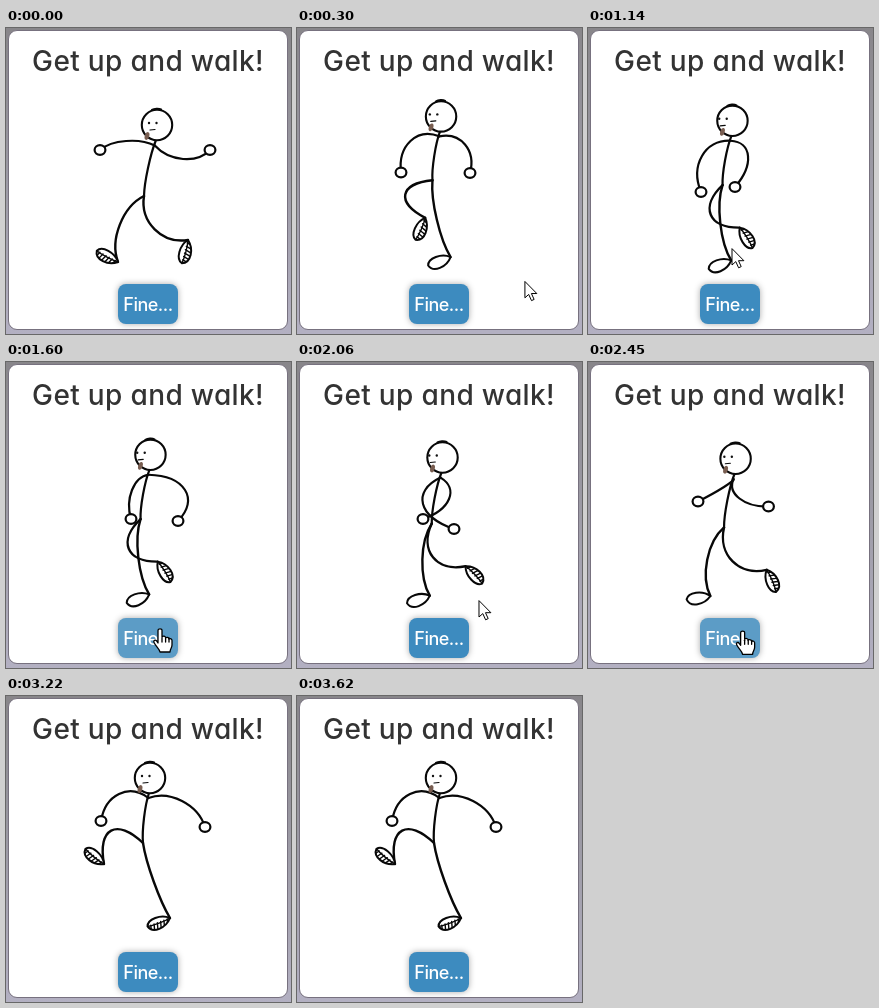
Animation, 285 px wide and 306 px high, one loop 3680 ms. Source, as an HTML page with a canvas:

```html
<!DOCTYPE html>
<html lang="en">
<head>
<meta charset="utf-8">
<title>Get up and walk!</title>
<style>
  html, body { margin: 0; width: 100%; height: 100%; overflow: hidden; }
  body {
    position: relative;
    background: linear-gradient(#88868a, #9d9ba6 50%, #b3b0c2);
    font-family: Inter, "Open Sans", sans-serif;
    font-feature-settings: "cv11";
    font-weight: 500;
    white-space: nowrap;
    text-align: center;
  }
  .card {
    position: absolute; left: 2px; top: 2px; width: 278px; height: 298px;
    background: #fff; border: 1px solid #77717f; border-radius: 9px;
  }
  h1 {
    position: absolute; left: 0; top: 16px; width: 284px; margin: 0;
    font-size: 28px; line-height: 34px; font-weight: 500; letter-spacing: .35px;
    color: #333;
  }
  .btn {
    position: absolute; left: 112px; top: 256px; width: 60px; height: 40px;
    border-radius: 8px; background: #3d8bbf; box-shadow: 0 0 6px #aaa;
    color: #fff; font-size: 18px; line-height: 41px; letter-spacing: -.5px;
  }
  .btn.hover { background: #5c9cc6; }
  canvas { position: absolute; left: 0; top: 0; }
</style>
</head>
<body>
<div class="card"></div>
<h1>Get up and walk!</h1>
<div class="btn">Fine...</div>
<canvas width="285" height="306"></canvas>
<script>
const LOOP = 3680, STEP = LOOP / 48, STRIDE = 6;
const ctx = document.querySelector('canvas').getContext('2d');
const btn = document.querySelector('.btn');

const lerp = (a, b, k) => a + (b - a) * k;
const mix = (a, b, k) => a.map((v, i) => lerp(v, b[i], k));
const smooth = k => k * k * (3 - 2 * k);

// Value of a keyed track [time, ...values] at time t
function along(track, t, ease = k => k) {
  const i = track.findIndex(key => key[0] > t);
  if (i === 0) return null;
  if (i < 0) return track.at(-1).slice(1);
  const [a, b] = [track[i - 1], track[i]];
  return mix(a.slice(1), b.slice(1), ease((t - a[0]) / (b[0] - a[0])));
}

// Arms through two strides: drawing, elbow x,y, hand x,y
const reach = [120, 113, 94, 122], reachBack = [177, 131, 204, 122];
const kick = [113, 98, 95, 125], kickBack = [176, 105, 199, 131];
const cross = [152, 137, 126, 157], crossBack = [126, 142, 157, 167];
const armTrack = (a, b, c, d, e) => [
  [0, ...a], [2, ...b], [3, ...c], [5, ...e],
  [6, ...a], [8, ...b], [9, ...d], [11, ...e]
];
const arms = [
  armTrack(reach, cross, [114, 128, 113, 164], [126, 128, 125, 157], kick),
  armTrack(reachBack, crossBack, [160, 128, 147, 159], [179, 128, 172, 159], kickBack)
];

// Line from a to b, pushed aside by d at its middle
function bow(a, b, d) {
  const [p, q] = [.25, .75].map(k => mix(a, b, k).map((v, i) => v + d[i] * 4 / 3));
  ctx.beginPath();
  ctx.moveTo(...a);
  ctx.bezierCurveTo(...p, ...q, ...b);
  ctx.stroke();
}

// Sideways offset of the given size, to the right of a-b on screen
function aside(a, b, size) {
  const len = Math.hypot(b[0] - a[0], b[1] - a[1]);
  return [(a[1] - b[1]) / len * size, (b[0] - a[0]) / len * size];
}

function oval(x, y, rx, ry) {
  ctx.beginPath();
  ctx.ellipse(x, y, rx, ry, 0, 0, 7);
  ctx.fill();
  ctx.stroke();
}

function foot(heel, angle, sole) {
  const len = 24;
  ctx.save();
  ctx.translate(...heel);
  ctx.rotate(angle);
  ctx.beginPath();
  ctx.moveTo(0, 0);
  ctx.bezierCurveTo(len * .3, -8, len * .9, -9, len, 0);
  ctx.bezierCurveTo(len * .9, 7, len * .3, 7, 0, 0);
  ctx.fill();
  ctx.stroke();
  if (sole) {
    ctx.clip();
    ctx.lineWidth = 1.4;
    bow([0, 0], [len, 0], [0, -1]);
    for (let d = 3; d < len; d += 3.5) bow([d, 0], [d + 2, -7], [0, 0]);
  }
  ctx.restore();
}

function leg(hip, heel, bend, angle, sole) {
  ctx.lineWidth = 2.4;
  bow(hip, heel, aside(hip, heel, bend));
  ctx.lineWidth = 2;
  foot(heel, angle, sole);
}

function face(x, y, turn) {
  ctx.lineWidth = 2.1;
  oval(x, y, 15.2, 15.2);
  bow([x - 5, y - 15], [x + 4, y - 15.5], [0, -1]);
  ctx.fillStyle = '#111';
  for (const dx of [0, 7.5]) {
    ctx.beginPath();
    ctx.arc(x - turn + dx, y - 2, 1.2, 0, 7);
    ctx.fill();
  }
  ctx.lineWidth = 1.2;
  bow([x - turn + 1, y + 5], [x - turn + 6, y + 4.5], [0, 0]);
  ctx.fillStyle = '#785d50';
  ctx.beginPath();
  ctx.ellipse(x - 10, y + 11, 2.2, 4, .3, 0, 7);
  ctx.fill();
}

function drawFigure(i) {
  const p = i % STRIDE / (STRIDE - 1), pass = Math.sin(Math.PI * p);
  const head = [144 + 7 * (1 - p) ** 3, 97 - 15 * p ** 2.5];
  const hip = [138 - p - 3 * pass, 168 - 21 * p ** 1.3];
  const neck = [head[0] - 1, head[1] + 15];
  const shoulder = mix(neck, hip, .1);

  ctx.lineCap = ctx.lineJoin = 'round';
  ctx.strokeStyle = '#080808';
  ctx.fillStyle = '#fff';
  ctx.lineWidth = 2.2;
  bow(neck, hip, [-2, 0]);

  for (const track of arms) {
    const [ex, ey, x, y] = along(track, i);
    const mid = mix(shoulder, [x, y], .5);
    bow(shoulder, [x, y], [ex - mid[0], ey - mid[1]]);
    oval(x, y, 5.4, 4.8);
  }

  // The planted foot slides back evenly; the free one lifts and swings ahead.
  const planted = [112 + 52 * p, 234 - 12 * p ** 4];
  const free = [182 - 84 * p ** 2, 212 - 44 * p ** 4 - 7 * pass];
  const toeDown = -.36 + .85 * (1 - p) ** 6;
  leg(hip, planted, 12 - 9 * p, Math.PI + toeDown, p % 1 === 0);
  leg(hip, free, 16 + 10 * p, 1.83 + 2 * p ** 4 - 1.13 * pass, true);

  face(...head, 8 + 5.5 * pass);
}

// time, x, y of the pointer tip
const pointer = [
  [290, 228, 254], [680, 153, 106], [1140, 144, 221], [1350, 152, 264],
  [1600, 154, 267], [2060, 182, 239], [2350, 154, 269], [2600, 156, 270],
  [2830, 198, 270], [3000, 220, 306]
];
const arrow = new Path2D('M0 0V16L3.8 12.6 6.6 18.8 9.2 17.6 6.5 11.7H11.5Z');
const hand = new Path2D('M-2 1.5C-2-.7 2-.7 2 1.5V8C3 6.6 5.4 7 5.6 8.8' +
  'C6.8 7.8 8.8 8.4 9 10C10.4 9.2 12 10 12 11.5V16C12 19 10 20 10 23H0' +
  'C-.4 20-4 17.5-6 13.5C-7 11.5-4.6 10.3-3.4 12L-2 14Z');

function drawPointer(tip, over) {
  ctx.save();
  ctx.translate(...tip);
  ctx.fillStyle = '#fff';
  ctx.strokeStyle = '#000';
  ctx.lineWidth = over ? 1.3 : 1;
  ctx.fill(over ? hand : arrow);
  ctx.stroke(over ? hand : arrow);
  if (over) for (const x of [2, 5.6, 9]) bow([x, 9], [x, 13], [0, 0]);
  ctx.restore();
}

function draw(t) {
  const n = t < 3620 ? Math.min(46, Math.floor((t + 10) / STEP)) : 47;
  // The walk lags one drawing behind for part of the loop.
  const drawing = n > 23 && n < 47 ? n - 1 : n;
  const time = n * STEP - 9;
  const tip = time < 3000 ? along(pointer, time, smooth) : null;
  const over = !!tip && Math.abs(tip[0] - 142) < 30 && Math.abs(tip[1] - 276) < 20;
  btn.classList.toggle('hover', over);
  ctx.clearRect(0, 0, 285, 306);
  drawFigure(drawing % (2 * STRIDE));
  if (tip) drawPointer(tip, over);
}

const start = performance.now();
function tick() {
  draw((performance.now() - start) % LOOP);
  requestAnimationFrame(tick);
}
tick();
</script>
</body>
</html>
```
